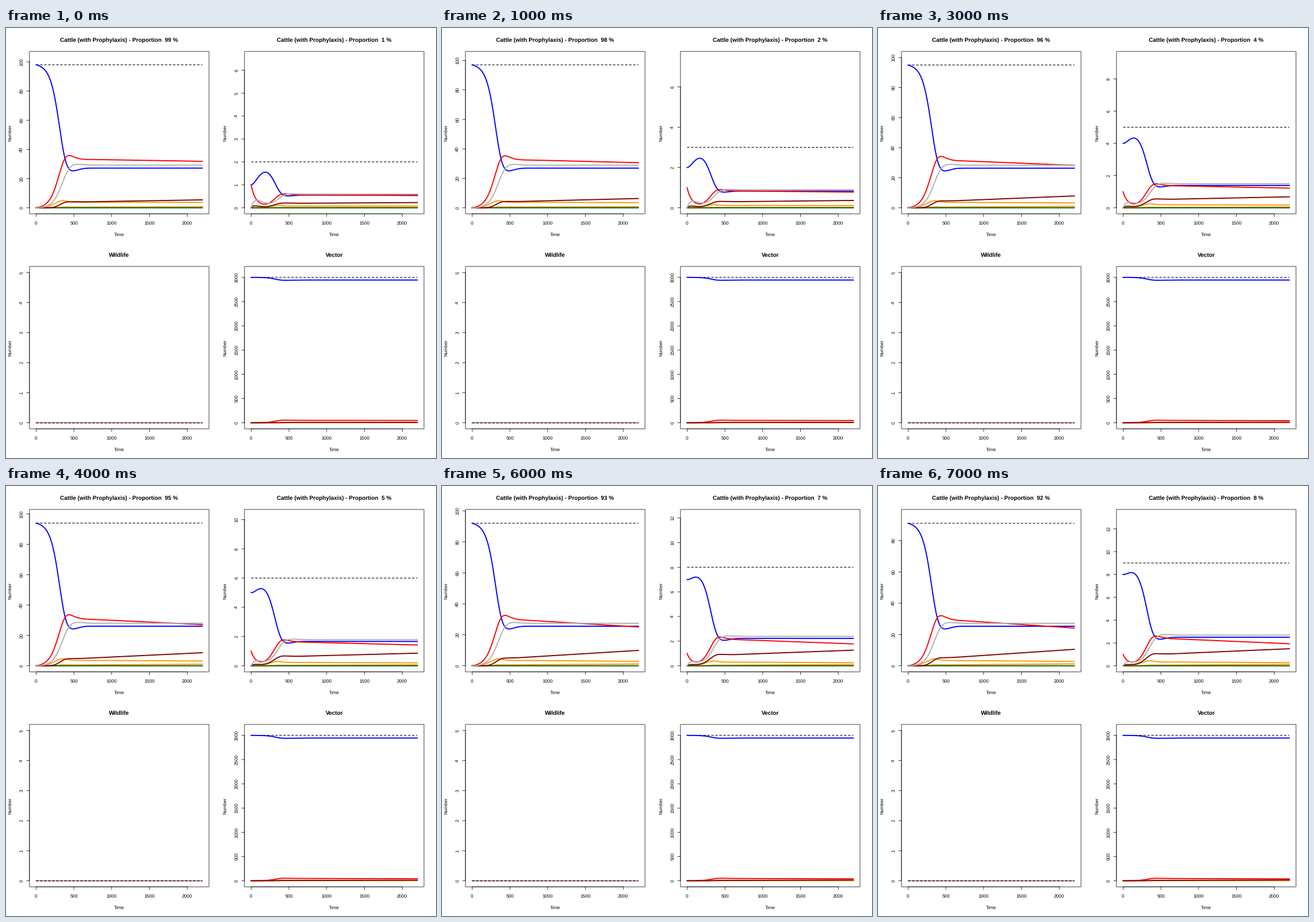
These frames come from a looping animation (748x748 px, 8000 ms). A matplotlib script:

```python
import numpy as np
import matplotlib
import matplotlib.pyplot as plt
from matplotlib.animation import FuncAnimation
from matplotlib.patches import Rectangle

matplotlib.rcParams["font.family"] = "Liberation Sans"
matplotlib.rcParams["text.hinting"] = "none"

SIZE, DPI = 748, 100
PT = 72 / DPI                 # points per pixel
LINE = 9.96                   # height of one margin line
PANEL = SIZE / 2
LEFT, RIGHT = 4.1 * LINE, PANEL - 2.1 * LINE
TOP, BOTTOM = 4.1 * LINE, PANEL - 5.1 * LINE
T_END = 2200
PLATEAU = 450
TIME = np.arange(0, T_END + 1, 5)

GREY = "#b0b0b0"
DARK_RED = "#7f0000"


def vector_level(t):
    """Infected vectors relative to their final level: growth, overshoot, rest."""
    rise = 1 - np.exp(-np.exp(0.015 * (t - 320)))
    return rise * (1 + 0.08 * np.exp(-((t - PLATEAU) / 110) ** 2))


def simulate(dt=0.5):
    """Shares (s, e, i, r) of a herd starting healthy and one starting infected."""
    onset, recovery, waning = 0.104, 0.012, 0.0153
    days = np.arange(0, T_END + dt, dt)
    force = recovery * 0.381 / 0.278 * vector_level(days)
    x = np.array([[1.0, 0, 0, 0], [0, 0, 1.0, 0]])
    states = []
    for f in force:
        states.append(x)
        flow = x * [f, onset, recovery, waning]
        x = x + dt * (np.roll(flow, 1, axis=1) - flow)
    picked = np.array(states)[::int(5 / dt)]
    return picked[:, 0].T, picked[:, 1].T


HEALTHY, INFECTED = simulate()

fig = plt.figure(figsize=(SIZE / DPI, SIZE / DPI), dpi=DPI, facecolor="white")
ax = fig.add_axes([0, 0, 1, 1])


def stroke(x, y, color="black", width=0.75, **kw):
    ax.plot(x, y, color=color, lw=width * PT, snap=False, **kw)


def label(x, y, text, size=8.3, **kw):
    ax.text(x, y, text, fontsize=size * PT, ha="center", va="baseline",
            rotation_mode="anchor", **kw)


class Panel:
    def __init__(self, col, row, title, top, step):
        self.x0, self.y0, self.top = col * PANEL, row * PANEL, top
        self.frame(title, step)

    def px(self, t):
        pad = (RIGHT - LEFT) * 0.04 / 1.08
        return self.x0 + LEFT + pad + np.asarray(t) / T_END * (RIGHT - LEFT) / 1.08

    def py(self, v):
        pad = (BOTTOM - TOP) * 0.04 / 1.08
        return self.y0 + BOTTOM - pad - np.asarray(v) / self.top * (BOTTOM - TOP) / 1.08

    def frame(self, title, step):
        left, bottom = self.x0 + LEFT, self.y0 + BOTTOM
        mid_x = self.x0 + (LEFT + RIGHT) / 2
        mid_y = self.y0 + (TOP + BOTTOM) / 2
        ax.add_patch(Rectangle((left, self.y0 + TOP), RIGHT - LEFT, BOTTOM - TOP,
                               fill=False, ec="black", lw=0.75 * PT, snap=False))
        label(mid_x, self.y0 + 24.3, title, 9.96, weight="bold")
        label(mid_x, bottom + 38.4, "Time")
        label(self.x0 + 9.2, mid_y, "Number", rotation=90)

        stroke(self.px([0, 2000]), [bottom, bottom])
        for t in range(0, 2001, 500):
            x = float(self.px(t))
            stroke([x, x], [bottom, bottom + LINE / 2])
            label(x, bottom + 18.5, str(t))

        ys = np.arange(0, self.top * 1.04, step).astype(int)
        stroke([left, left], self.py([0, ys[-1]]))
        for v in ys:
            y = float(self.py(v))
            stroke([left - LINE / 2, left], [y, y])
            label(self.x0 + 29.2, y, str(v), rotation=90)

    def curve(self, values, color):
        stroke(self.px(TIME), self.py(values), color, 1.9)

    def dashes(self, value, color="black", width=1.1):
        stroke(self.px([0, T_END]), self.py([value, value]), color, width,
               linestyle=(0, (4.2 / width, 2.8 / width)), dash_capstyle="butt")


def herd_panel(col, share, step, total, state, resistant, exposed_resistant):
    s, e, i, r = state
    title = f"Cattle (with Prophylaxis) - Proportion  {share} %"
    panel = Panel(col, 0, title, s.max() + 5, step)
    panel.dashes(total)
    panel.curve(s, "blue")
    panel.curve(e * (1 - exposed_resistant), "#ff9800")
    panel.curve(e * exposed_resistant, "#ff8c00")
    panel.curve(i * (1 - resistant), "red")
    panel.curve(0 * TIME, "#006400")
    panel.curve(i * resistant, DARK_RED)
    panel.curve(r, GREY)


def resistant_shares(k):
    """Resistant part of all infections in the large and the small herd."""
    drift = np.maximum(TIME - PLATEAU, 0) / (T_END - PLATEAU)
    start = 0.10 + 0.005 * k
    end = 0.12 + 0.0262 * k - 0.0004 * k * k
    large = start / (1 + np.exp((260 - TIME) / 45)) + (end - start) * drift
    start = 0.25 + 0.005 * k
    end = 0.28 + 0.0195 * k
    small = start * (1 - np.exp(-TIME / 55)) + (end - start) * drift
    return large, small


def update(n):
    ax.clear()
    ax.set_xlim(0, SIZE)
    ax.set_ylim(SIZE, 0)
    ax.axis("off")

    k = n + 1
    large, small = resistant_shares(k)
    herd_panel(0, 100 - k, 20, 99 - k, (99 - k) * HEALTHY, large, large)
    herd_panel(1, k, 1 if k == 1 else 2, k + 1, k * HEALTHY + INFECTED, small, large)

    wild = Panel(0, 1, "Wildlife", 5, 1)
    wild.curve(0 * TIME, "#b99aa0")
    wild.dashes(0, "#4a1414", 1.6)

    flies = Panel(1, 1, "Vector", 3100, 500)
    carriers = 56 * vector_level(TIME)
    flies.dashes(3000)
    flies.curve(3000 - carriers, "blue")
    flies.curve(0.05 * carriers, "#ff8c00")
    flies.curve(carriers * (1 - large), "red")
    flies.curve(carriers * large, DARK_RED)
    return []


anim = FuncAnimation(fig, update, frames=8, interval=1000, repeat=True, repeat_delay=0)
plt.show()
```
